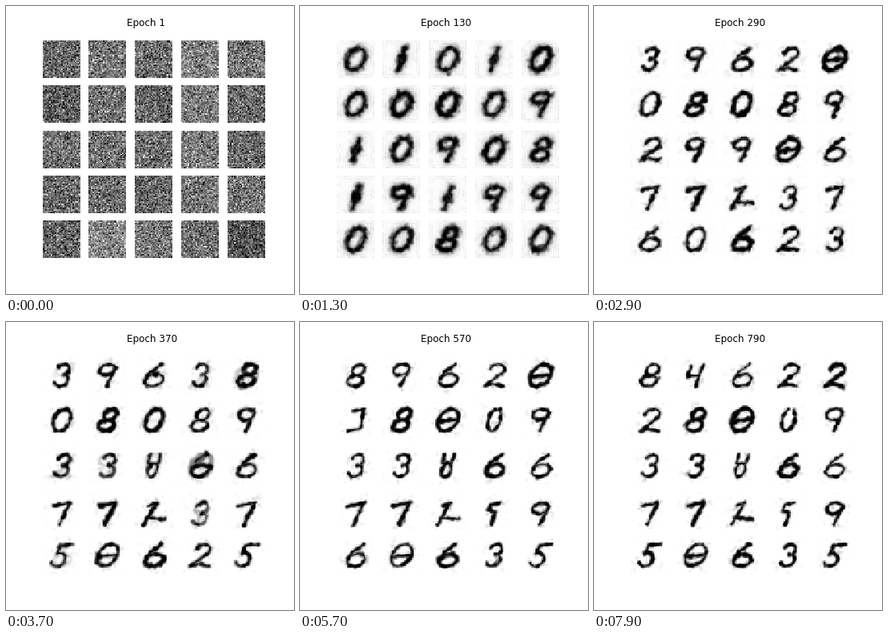
Animation of 360x360 px, one loop 8 s. Source, as a matplotlib script:

```python
import numpy as np
import matplotlib.pyplot as plt
from matplotlib.animation import FuncAnimation

FRAMES, N = 80, 28
CELL = 46.86  # side of one picture on the stage, px
SLANT = .3
rng = np.random.default_rng(7)


def arc(x, y, rx, ry, start=0, end=360):
    """Elliptic arc, degrees clockwise from the right."""
    a = np.radians(np.linspace(start, end, 60))
    return np.stack([x + rx * np.cos(a), y + ry * np.sin(a)], 1)


def line(*points):
    p = np.array(points, float)
    i = np.arange(len(p))
    t = np.linspace(0, len(p) - 1, 30 * len(p))
    return np.stack([np.interp(t, i, p[:, 0]), np.interp(t, i, p[:, 1])], 1)


def glyph(half_width, *strokes):
    """Slant the strokes and fit them around the origin, in px."""
    p = np.vstack(strokes)
    p[:, 0] -= SLANT * p[:, 1]
    low, high = p.min(0), p.max(0)
    return (2 * (p - low) / (high - low) - 1) * (half_width - 2, 13.5)


ring = arc(0, 0, .75, 1)
GLYPHS = {
    "0": glyph(13, ring),
    "o": glyph(15, ring, line((-.7, .15), (.7, -.05))),
    "u": glyph(10, arc(0, 0, .7, 1, -60, 250)),
    "b": glyph(6, line((0, -1), (0, 1)), arc(0, 0, .2, .4)),
    "2": glyph(14, arc(0, -.5, .7, .5, 190, 400), line((.5, -.2), (-.8, .9), (-.1, .7), (1, .9))),
    "3": glyph(11, arc(0, -.5, .7, .5, 200, 440), arc(0, .45, .8, .55, 280, 510)),
    "4": glyph(12, line((-.6, -.8), (-.8, .1), (.6, .05)), line((.8, -1), (.5, 0), (.5, 1))),
    "5": glyph(15, line((1, -1), (-.3, -.9), (-.5, -.1)), arc(-.2, .4, .75, .6, 250, 510)),
    "6": glyph(13, line((.2, -1), (-.5, -.3), (-.7, .4)), arc(0, .45, .75, .55)),
    "7": glyph(12, line((-.8, -.7), (.8, -1), (.5, 0), (.3, 1))),
    "8": glyph(13, arc(.05, -.5, .55, .5), arc(0, .5, .7, .5)),
    "9": glyph(12, arc(0, -.5, .65, .5), line((.65, -.7), (.5, .1), (.4, 1))),
    "q": glyph(10, line((-.5, -1), (-.5, -.2), (.5, -.2), (.6, -1)), arc(.1, .4, .5, .6)),
    "j": glyph(12, line((-.5, -.8), (.6, -1), (.7, .7), (-.5, .9))),
    "t": glyph(15, line((-.3, -.7), (.1, -1), (-.1, 1)), line((-.1, .4), (1, .5))),
    "s": glyph(9, line((.8, -1), (-.3, -.8), (-.4, -.3), (.5, -.1), (.3, 1))),
}

# Shape shown by every cell at a given step
KEYS = {
    0: "bbbbb bbbbb bbbbb bbbbb bbbbb",
    13: "0b0b0 00009 b0908 b9b99 00800",
    29: "3962o 08089 299o6 77t37 60623",
    45: "39638 j8o89 33q66 77ts9 5o625",
    57: "8962o j8ou9 33q66 77ts9 6o635",
    66: "84622 28ou9 33q66 77ts9 5o635",
}
STEPS = list(KEYS)
BOLD = [4, 6, 7, 13, 16, 22]

gy, gx = np.mgrid[:N, :N]


def distance(name, row):
    """Distance of every picture element to the nearest stroke."""
    drop = 4 if row == 3 else 0
    x, y = ((GLYPHS[name] + (24, 23.5 + drop)) * N / CELL - .5).T
    return np.hypot(gx[..., None] - x, gy[..., None] - y).min(-1)


def blur(a, axis):
    return (np.roll(a, 1, axis) + 2 * a + np.roll(a, -1, axis)) / 4


fields = np.array([[distance(name, row)
                    for row, names in enumerate(KEYS[step].split())
                    for name in names] for step in STEPS])

bold = np.zeros((25, 1, 1))
bold[BOLD] = .45
lag = rng.uniform(-.25, .25, (25, 1, 1))

# Wobble that makes the stroke edges ragged
wobble = rng.normal(size=(FRAMES, 25, N, N))
for axis in (0, 2, 3, 2, 3):
    wobble = blur(wobble, axis)
wobble /= wobble.std()

# Static of the untrained network, with its upsampling lattice
lattice = (gx + gy) % 2 * .5 + gx % 2 * (gy % 2) * .3
level = rng.normal(.55, .05, (25, 1, 1))
static = level + rng.normal(size=(25, N, N)) * (.12 + .13 * lattice)

edge = np.minimum(np.minimum(gx, gy), N - 1 - np.maximum(gx, gy))
rim = (edge % 2 == 0) * (edge < 3) * (.5 + .5 * ((gx + gy) % 3 == 0))


def ink(key, n):
    radius = 1.15 + 2.2 * np.exp(-n / 13) + bold
    soft = .32 + 1.7 * np.exp(-n / 10)
    d = fields[key] + wobble[n] * (.4 + .4 * np.exp(-n / 20))
    return 1 / (1 + np.exp((d - radius) / soft))


def pictures(n):
    if n == 0:
        return np.clip(static, 0, 1)
    k = min(np.searchsorted(STEPS, n) - 1, len(STEPS) - 2)
    f = min((n - STEPS[k]) / (STEPS[k + 1] - STEPS[k]), 1)
    mix = np.clip(2 * (f - .5 - lag) + .5, 0, 1)
    mix = mix * mix * (3 - 2 * mix)
    out = (1 - mix) * ink(k, n) + mix * ink(k + 1, n)
    near = (1 - mix) * fields[k] + mix * fields[k + 1]
    smudge = np.clip(wobble[n] - .9, 0, 1) * np.exp(-near / 3)
    out += .35 * smudge + .25 * np.exp(-n / 9 - near / 5)
    out += rim * .22 * np.exp(-n / 11) * np.clip(.6 + .5 * wobble[n], 0, 1)
    out += .25 * np.exp(-n / 4) * lattice
    fade = np.exp(-n / 2.2)
    return np.clip(out * (1 - fade) + static * fade, 0, 1)


fig, axes = plt.subplots(5, 5, figsize=(5, 5), dpi=72, facecolor="white")
fig.subplots_adjust(left=.125, right=.9, bottom=.125, top=.88, wspace=.2, hspace=.2)
images = []
for ax in axes.flat:
    ax.axis("off")
    images.append(ax.imshow(np.zeros((N, N)), cmap="binary", vmin=0, vmax=1,
                            interpolation="nearest"))
title = fig.text(.42, 1 - 25 / 360, "", fontsize=12, family="DejaVu Sans")


def draw(n):
    for image, data in zip(images, pictures(n)):
        image.set_data(data)
    title.set_text(f"Epoch {max(1, 10 * n)}")
    return images + [title]


anim = FuncAnimation(fig, draw, frames=FRAMES, init_func=lambda: draw(0),
                     interval=100, repeat=True, repeat_delay=0, blit=False)
plt.show()
```
